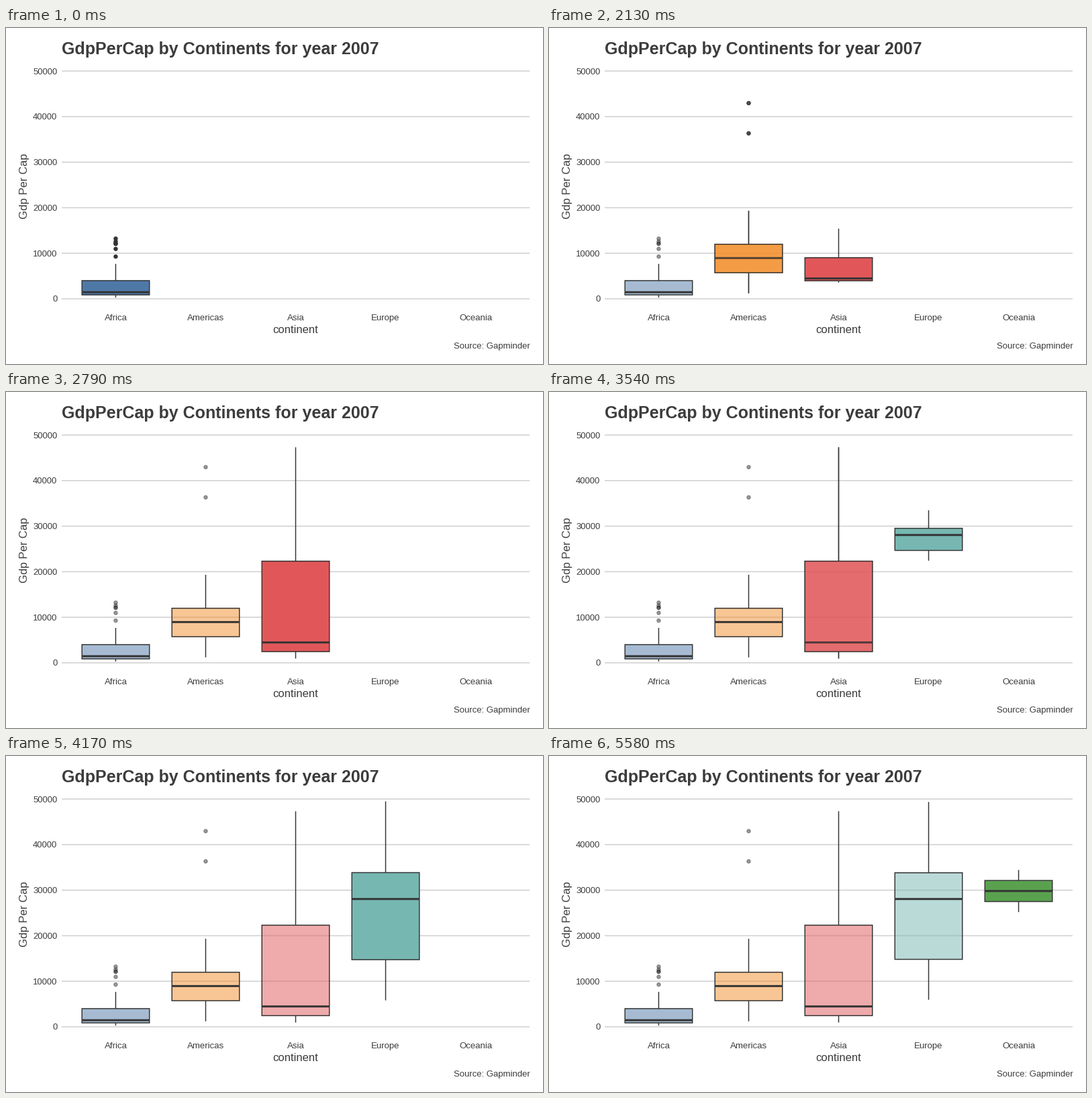
Recreate the animation shown at these times as a matplotlib script. Size 800 px wide and 500 px high, loop 9000 ms.

```python
import math

import matplotlib.pyplot as plt
from matplotlib.animation import FuncAnimation
from matplotlib.patches import Circle, Rectangle

plt.rcParams["path.snap"] = False
plt.rcParams["font.family"] = "Liberation Sans"

WIDTH, HEIGHT, DPI = 800, 500, 100
FRAMES, INTERVAL = 300, 30
STARTS = (24, 71, 118, 164)  # frame on which each later box begins to enter
STEPS = 23

LEFT, RIGHT, TOP, BOTTOM = 83, 780, 51.75, 417.75
Y_MIN, Y_MAX = -2176.4, 51811.1
TEXT, GRID, INK = "#3C3C3C", "#D2D2D2", "#333333"
LINE, MEDIAN_LINE, GRID_LINE = 1.48, 2.96, 1.62
SHADOW_ALPHA = 0.5

# name, fill, (ymin, lower, middle, upper, ymax), outliers
BOXES = [
    ("Africa", "#4E79A7", (278, 863, 1452, 3994, 7670),
     (9270, 10957, 12057, 12154, 12570, 13206)),
    ("Americas", "#F28E2B", (1202, 5728, 8948, 11978, 19329), (36319, 42952)),
    ("Asia", "#E15759", (944, 2452, 4471, 22316, 47307), ()),
    ("Europe", "#76B7B2", (5937, 14812, 28054, 33818, 49357), ()),
    ("Oceania", "#59A14F", (25185, 27498, 29810, 32123, 34435), ()),
]


def px(size):
    return size * 72 / DPI


def x_pos(unit):
    return LEFT + (unit - 0.4) * (RIGHT - LEFT) / 5.2


def y_pos(value):
    return BOTTOM - (value - Y_MIN) * (BOTTOM - TOP) / (Y_MAX - Y_MIN)


def back_out(t):
    f = 1 - t
    return 1 - (f ** 3 - f * math.sin(f * math.pi))


fig = plt.figure(figsize=(WIDTH / DPI, HEIGHT / DPI), dpi=DPI, facecolor="white")
ax = fig.add_axes([0, 0, 1, 1])
ax.set_xlim(0, WIDTH)
ax.set_ylim(HEIGHT, 0)
ax.axis("off")

panel = Rectangle((LEFT, TOP), RIGHT - LEFT, BOTTOM - TOP, transform=ax.transData)
artists = []


def label(x, y, text, size, ha="center", **kwargs):
    ax.text(x, y, text, fontsize=px(size), color=TEXT, ha=ha,
            va="baseline", **kwargs)


def draw_static():
    for value in range(0, 50001, 10000):
        y = y_pos(value)
        ax.plot([LEFT, RIGHT], [y, y], color=GRID, lw=px(GRID_LINE),
                solid_capstyle="butt", zorder=1)
        label(76.4, y + 4.5, str(value), 13.1, ha="right")
    for i, box in enumerate(BOXES, 1):
        label(x_pos(i), 434.6, box[0], 13.2)
    label(LEFT, 38.8, "GdpPerCap by Continents for year 2007", 25,
          ha="left", weight="bold")
    label(x_pos(3), 454.2, "continent", 16.67)
    label(RIGHT + 0.5, 477.2, "Source: Gapminder", 13.1, ha="right")
    ax.text(32.2, (TOP + BOTTOM) / 2, "Gdp Per Cap", fontsize=px(16.67),
            color=TEXT, rotation=90, ha="right", va="center",
            rotation_mode="default").set_visible(False)
    ax.text(32.2, (TOP + BOTTOM) / 2, "Gdp Per Cap", fontsize=px(16.67),
            color=TEXT, rotation=90, ha="center", va="baseline",
            rotation_mode="anchor")


def add_patch(patch):
    artists.append(ax.add_patch(patch))
    patch.set_clip_path(panel)


def add_line(xs, ys, color, width):
    line, = ax.plot(xs, ys, color=color, lw=px(width),
                    solid_capstyle="butt", zorder=2 + len(artists) * 0.001)
    line.set_clip_path(panel)
    artists.append(line)


def draw_box(index, scale=1, fill_alpha=1, line_alpha=1):
    _, fill, stats, outliers = BOXES[index]
    middle = stats[2]
    ymin, lower, mid, upper, ymax = (
        y_pos(middle + (value - middle) * scale) for value in stats)
    x = x_pos(index + 1)
    half = 0.375 * (RIGHT - LEFT) / 5.2
    ink = (INK, line_alpha)
    for value in outliers:
        dot = (INK, fill_alpha)
        add_patch(Circle((x, y_pos(value)), 2.71, fc=dot, ec=dot, lw=px(0.98),
                         zorder=2 + len(artists) * 0.001))
    add_line([x, x], [upper, ymax], ink, LINE)
    add_line([x, x], [lower, ymin], ink, LINE)
    add_patch(Rectangle((x - half, upper), 2 * half, lower - upper,
                        fc=(fill, fill_alpha), ec=ink, lw=px(LINE),
                        zorder=2 + len(artists) * 0.001))
    add_line([x - half, x + half], [mid, mid], ink, MEDIAN_LINE)


def update(frame):
    while artists:
        artists.pop().remove()
    current = sum(frame >= start for start in STARTS)
    if current == 0:
        draw_box(0)
        return
    step = min(frame - STARTS[current - 1] + 1, STEPS)
    progress = back_out(step / STEPS)
    for past in range(current):
        draw_box(past, fill_alpha=SHADOW_ALPHA)
    fade = 1 - progress
    if fade > 1e-6:
        draw_box(current - 1, fill_alpha=fade, line_alpha=fade)
    draw_box(current, scale=progress)


draw_static()
anim = FuncAnimation(fig, update, frames=FRAMES, interval=INTERVAL,
                     init_func=lambda: update(0), repeat=True, repeat_delay=0)
plt.show()
```
